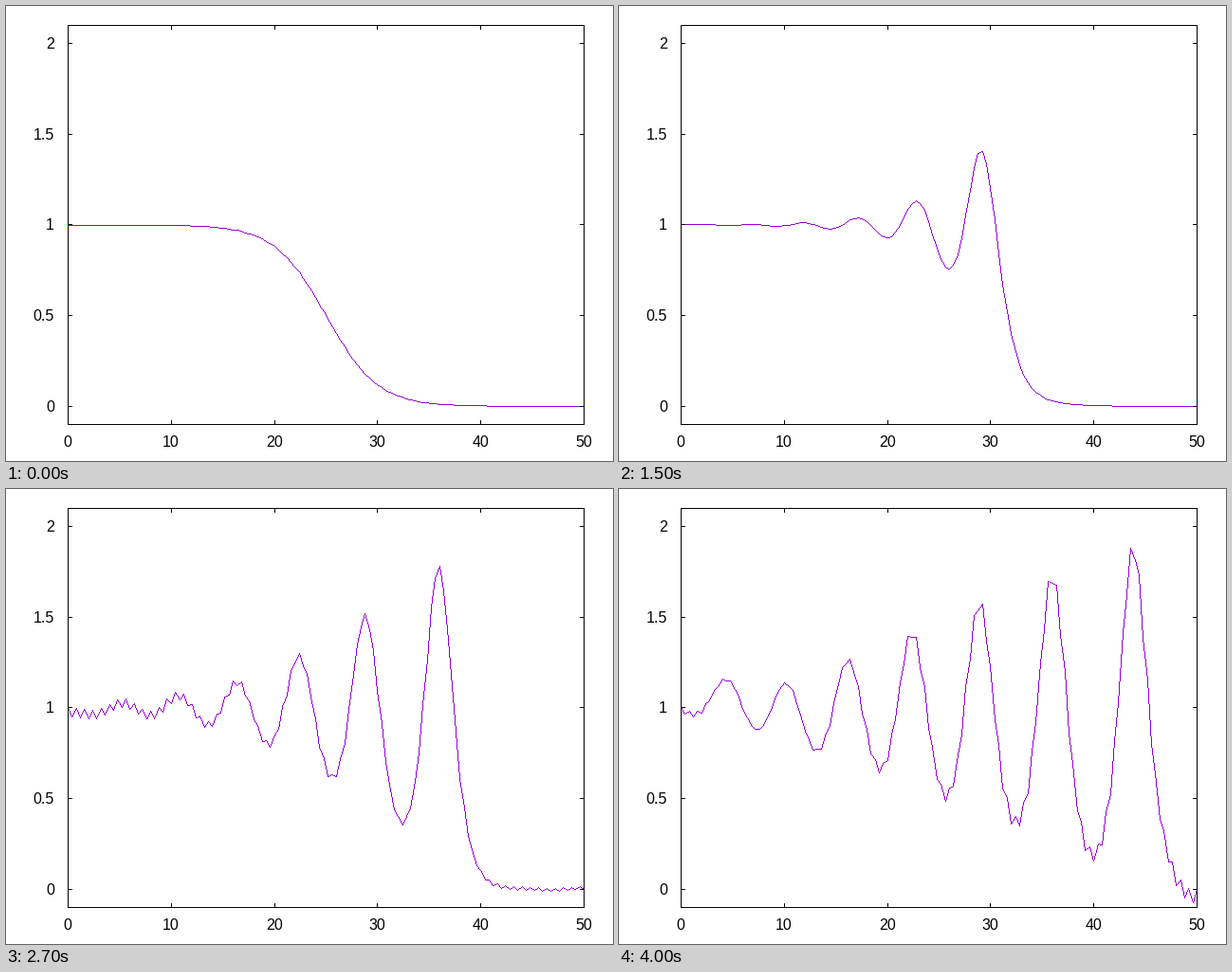
Write a matplotlib script that moves like this. It is 640x480 px and loops after 4100 ms.

```python
import numpy as np
import matplotlib.pyplot as plt
from matplotlib.animation import FuncAnimation
from matplotlib.collections import LineCollection

W, H, DPI = 640, 480, 100
LEFT, RIGHT, TOP, BOTTOM = 65, 609, 20, 441
PX = 72 / DPI  # one pixel in points
plt.rcParams["text.hinting"] = "default"

# Korteweg-de Vries equation: u_t + EPS u u_x + MU u_xxx = 0
EPS, MU = 0.2, 0.1
DX, DT = 0.4, 0.1
FRAMES, STEPS = 41, 50
x = np.arange(126) * DX


def slope_terms(u):
    """Change of the inner points over one time step."""
    mean = (u[2:] + u[1:-1] + u[:-2]) / 3
    diff = u[2:] - u[:-2]
    third = -diff
    third[1:-1] = u[4:] - 2 * u[3:-1] + 2 * u[1:-3] - u[:-4]
    return EPS * DT / (2 * DX) * mean * diff + MU * DT / (2 * DX**3) * third


def simulate():
    old = 0.5 * (1 - np.tanh((x - 25) / 5))
    waves = [old.copy()]
    old[0], old[-1] = 1, 0
    now = old.copy()
    now[1:-1] -= slope_terms(old)
    for step in range(2, (FRAMES - 1) * STEPS + 1):
        new = old.copy()
        new[1:-1] -= 2 * slope_terms(now)
        old, now = now, new
        if step % STEPS == 0:
            waves.append(now.copy())
    return waves


def nearest(v):
    return np.floor(np.asarray(v) + 0.5)


def to_px(v):
    return LEFT + nearest(v / 50 * (RIGHT - LEFT))


def to_py(v):
    return BOTTOM - nearest((v + 0.1) / 2.2 * (BOTTOM - TOP))


def dots(xs, ys):
    """One-pixel dashes along a polyline, without smoothing."""
    cols, rows = [], []
    for x0, y0, x1, y1 in zip(xs[:-1], ys[:-1], xs[1:], ys[1:]):
        n = int(max(abs(x1 - x0), abs(y1 - y0))) + 1
        cols.append(nearest(np.linspace(x0, x1, n)))
        rows.append(nearest(np.linspace(y0, y1, n)) + 0.5)
    px, py = np.concatenate(cols), np.concatenate(rows)
    return np.stack([np.column_stack([px, py]),
                     np.column_stack([px + 1, py])], axis=1)


fig = plt.figure(figsize=(W / DPI, H / DPI), dpi=DPI, facecolor="white")
ax = fig.add_axes([0, 0, 1, 1])
ax.set(xlim=(0, W), ylim=(H, 0))
ax.axis("off")


def stroke(xs, ys, color="black", z=3):
    line = LineCollection(dots(xs, ys), colors=color, linewidths=PX,
                          antialiaseds=False, capstyle="butt", zorder=z)
    line.set_snap(False)
    return ax.add_collection(line, autolim=False)


def label(px, py, text, align):
    ax.text(px, py, text, ha=align, va="baseline", color="black",
            family="Liberation Sans", size=16 * PX)


stroke([LEFT, RIGHT, RIGHT, LEFT, LEFT], [TOP, TOP, BOTTOM, BOTTOM, TOP])
for v in range(0, 51, 10):
    px = to_px(v)
    stroke([px, px], [BOTTOM, BOTTOM - 4])
    stroke([px, px], [TOP, TOP + 4])
    label(px, 465, str(v), "center")
for v in (0, 0.5, 1, 1.5, 2):
    py = to_py(v)
    stroke([LEFT, LEFT + 4], [py, py])
    stroke([RIGHT, RIGHT - 4], [py, py])
    label(51, py + 6, f"{v:g}", "right")

waves = simulate()
curve = stroke(to_px(x), to_py(waves[0]), "#9400d3", 2)


def draw(i):
    curve.set_segments(dots(to_px(x), to_py(waves[i])))
    return [curve]


anim = FuncAnimation(fig, draw, frames=FRAMES, interval=100, repeat=True,
                     repeat_delay=0, blit=False)
plt.show()
```
